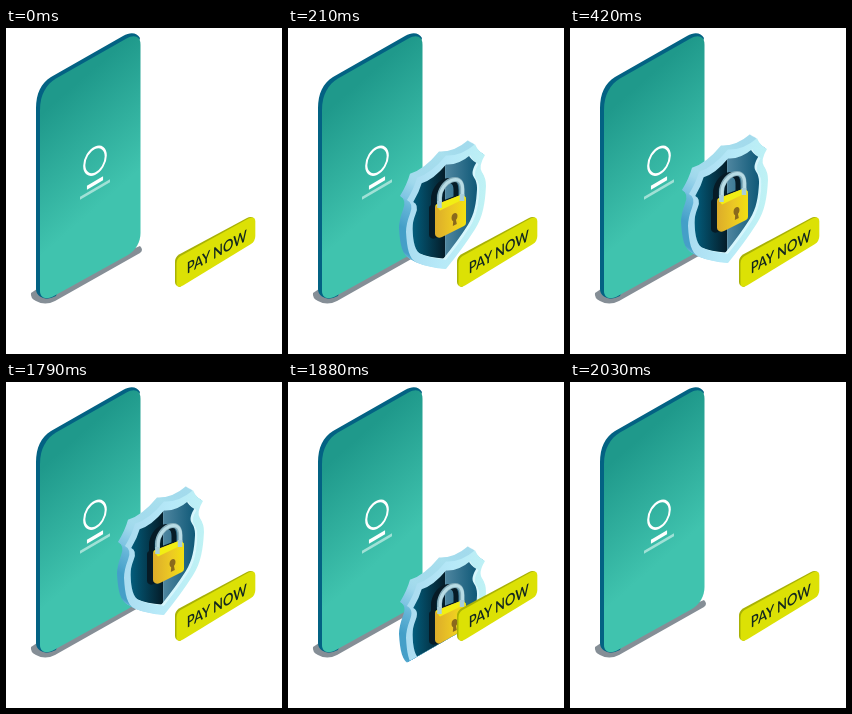
An HTML page that plays this animation: 276 px wide and 326 px high, repeating every 3490 ms.

```html
<!DOCTYPE html>
<html lang="en">
<head>
<meta charset="utf-8">
<title>Secure payment</title>
<style>
  html, body { margin: 0; width: 100%; height: 100%; overflow: hidden; background: #fff; }
  svg { display: block; width: 100vw; height: 100vh; }
  text { font: 600 15px Lato, "Open Sans", sans-serif; }
</style>
</head>
<body>
<svg viewBox="0 0 276 326">
  <defs>
    <linearGradient id="screen" x1="0.35" y1="0.1" x2="0.6" y2="0.85">
      <stop offset="0.1" stop-color="#1f998b"/>
      <stop offset="0.75" stop-color="#40c3ae"/>
    </linearGradient>
    <linearGradient id="rim" x1="0" y1="0.4" x2="1" y2="0.6">
      <stop offset="0" stop-color="#a9dbf0"/>
      <stop offset="0.5" stop-color="#b6e9f8"/>
      <stop offset="1" stop-color="#bff2f4"/>
    </linearGradient>
    <linearGradient id="side" x1="0" y1="0" x2="0" y2="1">
      <stop offset="0" stop-color="#a9e0ee"/>
      <stop offset="0.1" stop-color="#a0d8ec"/>
      <stop offset="0.2" stop-color="#7cc3e2"/>
      <stop offset="0.45" stop-color="#439fc8"/>
      <stop offset="0.7" stop-color="#469fc8"/>
      <stop offset="0.9" stop-color="#a5e0f2"/>
    </linearGradient>
    <linearGradient id="panelLeft">
      <stop offset="0.1" stop-color="#036080"/>
      <stop offset="1" stop-color="#041c28"/>
    </linearGradient>
    <linearGradient id="panelRight">
      <stop offset="0" stop-color="#4f86a0"/>
      <stop offset="1" stop-color="#0a5574"/>
    </linearGradient>
    <linearGradient id="brass">
      <stop offset="0" stop-color="#dcac2a"/>
      <stop offset="0.55" stop-color="#ecc824"/>
      <stop offset="1" stop-color="#f2e010"/>
    </linearGradient>
    <path id="crest" d="M0 121.500 Q15 131 29 127 Q32 136 39 143.500 Q32 151 36 159 Q40 167 40 175
      C39 192 37 204 29 212 Q17 224 0 235 Q-17 224 -29 212 C-37 204 -39 192 -40 175
      Q-40 167 -36 159 Q-32 151 -39 143.500 Q-32 136 -29 127 Q-15 131 0 121.500Z"/>
    <path id="shackle" d="M151.500 175 V164 C151.500 147 174 137 174 155 V167" fill="none"/>
    <path id="lockBody" d="M147 173 Q147 171 149 170 L174 160.500 Q178 162 178 165 V189
      Q178 191 176 192 L154 203 Q151 204.500 149 203 Q147 202 147 200Z"/>
    <clipPath id="crestClip"><use href="#crest"/></clipPath>
    <clipPath id="floor"><path d="M100 0 H210 V228 L100 291.400Z"/></clipPath>
  </defs>

  <g id="phone">
    <path fill="#858e96" d="M31 261 L25 265 Q24 270 30 273 Q39 278 49 273 L134 225 Q138 222 134 218Z"/>
    <path fill="#036283" d="M30 80 C30 66 35 55 45 49 L117 8 C125 3.500 131 5 134 10 L50 268
      Q40 273 34 268.500 Q30 266 30 261Z"/>
    <path fill="url(#screen)" d="M34 82 C34 67 40 56.500 50 50.500 L120.500 10.500 C128.500 6 134.500 8.500 134.500 16.500
      V205 C134.500 214 130 222 122 227 L47 268.500 C40 272 34 270 34 263Z"/>
    <g fill="none" stroke="#fff">
      <circle r="12.500" stroke-width="2.500" transform="matrix(.86 -.38 0 1.040 89 132.700)"/>
      <g transform="matrix(.866 -.5 0 1 89 133)">
        <path d="M-9.300 22 H9.300" stroke-width="4"/>
        <path d="M-17.300 28.500 H17.300" stroke="#a0e1d6" stroke-width="3"/>
      </g>
    </g>
  </g>

  <g clip-path="url(#floor)">
    <g id="shield">
      <g id="edge" fill="url(#side)"></g>
      <g transform="matrix(1 -.577 0 1 158 0)">
        <use href="#crest" fill="url(#rim)"/>
        <g transform="translate(0 178) scale(.84) translate(0 -178)" clip-path="url(#crestClip)">
          <use href="#crest" fill="#d6f6fc"/>
          <g transform="translate(-3 -3.500)" clip-path="url(#crestClip)">
            <path fill="url(#panelLeft)" d="M-43 118 H2 V238 H-43Z"/>
            <path fill="url(#panelRight)" d="M2 118 H43 V238 H2Z"/>
          </g>
        </g>
      </g>
      <g transform="translate(-6 1)" fill="#061b26" stroke="#061b26">
        <use href="#shackle" stroke-width="5"/>
        <use href="#lockBody" stroke="none"/>
      </g>
      <use href="#shackle" stroke="#86aebb" stroke-width="5"/>
      <use href="#shackle" stroke="#b8dce5" stroke-width="3" transform="translate(.6 0)"/>
      <use href="#lockBody" fill="url(#brass)"/>
      <path fill="#f2ee14" d="M147.500 171 L174 160.500 L178 164 L152 176.500Z"/>
      <path d="M151.500 174 V167 M174 167 V160" stroke="#a9ced9" stroke-width="4.500"/>
      <path fill="#8a691c" d="M163.500 184 C163.500 179 169.500 177 169.500 182 Q169.500 184.500 168 186
        L168.800 190 L164.800 192 L165.200 187.500 Q163.500 187 163.500 184Z"/>
    </g>
  </g>

  <g id="button">
    <path fill="#a8b105" d="M169 234 Q169 229 173 226.500 L241 190 Q245 188 248 190.500 L174 259 Q169 258 169 254Z"/>
    <path fill="#dce105" d="M170.500 235.500 Q170.500 230.500 174.500 228 L242.500 190.500 Q249.300 187.500 249.300 193.500 V208
      Q249.300 213 245 216 L177 257.500 Q170.500 261 170.500 255Z"/>
    <text transform="matrix(.866 -.485 0 1.040 210.800 229.300)" text-anchor="middle" fill="#12271f">PAY NOW</text>
  </g>
</svg>
<script>
  const LOOP = 3490, STEP = 30, DROP_START = 1790, HIDDEN = 150;
  const rise = [[0, 150], [60, 116], [150, 60], [210, 6], [240, -5], [300, -1], [420, 0]];
  const drop = [[0, -2], [30, 8], [90, 58], [240, 150]];
  const shield = document.getElementById("shield");
  const edge = document.getElementById("edge");

  // Stacked copies give the shield its thickness.
  for (let i = 7; i > 0; i--) {
    const layer = document.createElementNS("http://www.w3.org/2000/svg", "use");
    layer.setAttribute("href", "#crest");
    layer.setAttribute("transform", `matrix(1 -.577 0 1 ${158 - i} ${-i * 0.577})`);
    edge.append(layer);
  }

  function slope(keys, i) {
    const a = keys[Math.max(i - 1, 0)], b = keys[Math.min(i + 1, keys.length - 1)];
    return (b[1] - a[1]) / (b[0] - a[0]);
  }

  // Smooth Hermite curve through [time, value] keys.
  function curve(keys, t) {
    const last = keys.length - 1;
    if (t >= keys[last][0]) return keys[last][1];
    const i = keys.findIndex(k => k[0] > t) - 1;
    const [t0, v0] = keys[i], [t1, v1] = keys[i + 1];
    const d = t1 - t0, s = (t - t0) / d, r = 1 - s;
    return v0 * (1 + 2 * s) * r * r + v1 * s * s * (3 - 2 * s)
      + d * s * r * (slope(keys, i) * r - slope(keys, i + 1) * s);
  }

  const snap = t => Math.floor(t / STEP) * STEP;

  function draw(time) {
    const t = time % LOOP;
    const y = t < DROP_START ? curve(rise, snap(t)) : curve(drop, snap(t - DROP_START));
    shield.setAttribute("transform", `translate(0 ${y.toFixed(2)})`);
    shield.style.display = y >= HIDDEN ? "none" : "";
  }

  const start = performance.now();
  function tick() {
    draw(performance.now() - start);
    requestAnimationFrame(tick);
  }
  tick();
</script>
</body>
</html>
```
